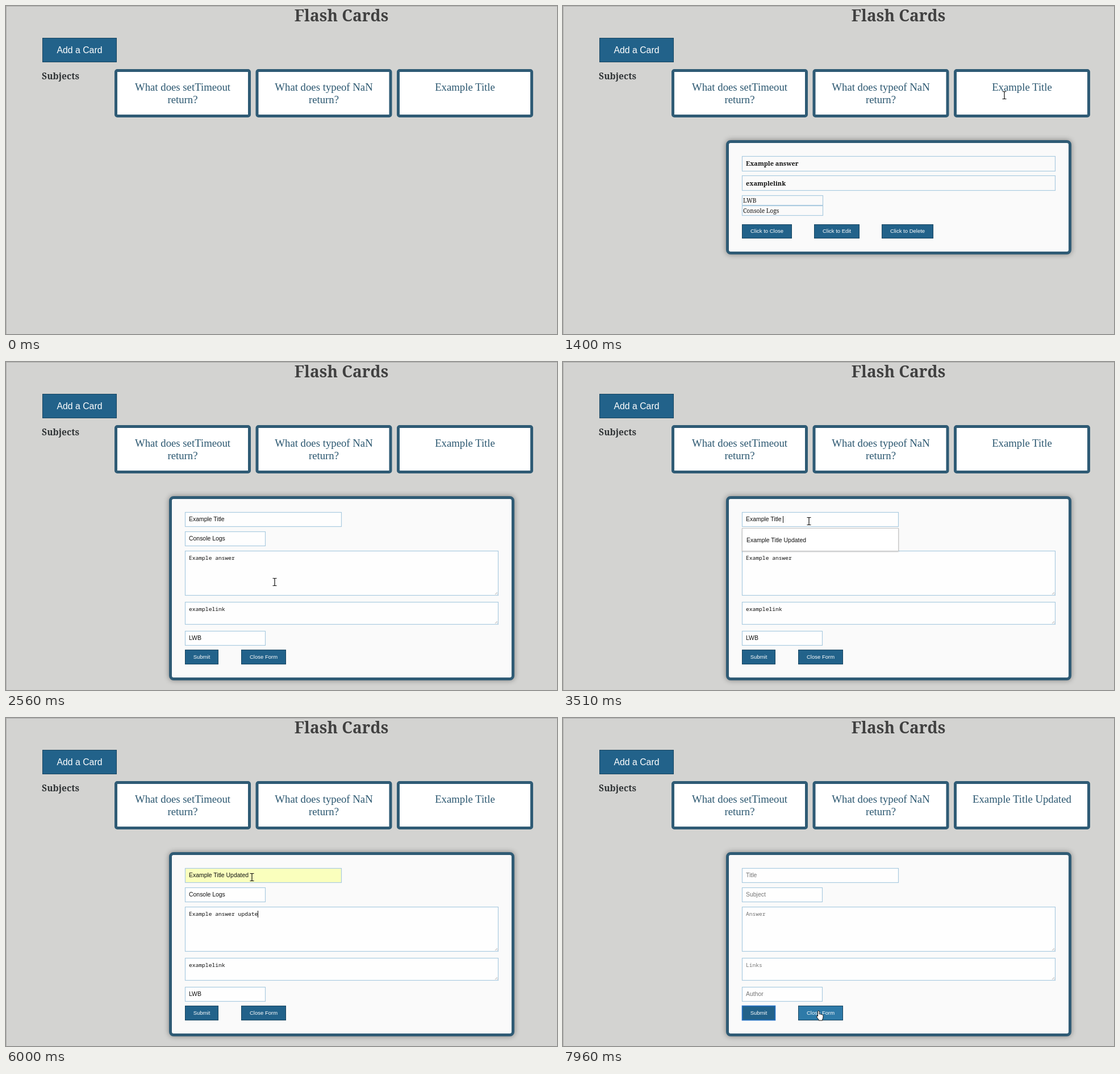
Write an HTML page that moves like this. It is 970x577 px and loops after 8000 ms.

```html
<!DOCTYPE html>
<html lang="en">
<head>
<meta charset="utf-8">
<title>Flash Cards</title>
<style>
  html, body { margin: 0; width: 100%; height: 100%; overflow: hidden; background: #d3d3d1; }
  svg { display: block; width: 970px; height: 577px; }
  text { white-space: pre; font: 10.45px "Liberation Sans", sans-serif; fill: #111; }
  .mid { text-anchor: middle; }
  .heading { font: bold 28px "Noto Serif", serif; fill: #404040; }
  .subjects { font: bold 15.6px "Noto Serif", serif; fill: #303436; }
  .question { font: 18.75px "Liberation Serif", serif; fill: #2b5770; text-anchor: middle; }
  .strong { font: bold 11px "Noto Serif", serif; }
  .serif { font: 10.3px "Noto Serif", serif; }
  .mono { font: 9.65px "Noto Sans Mono", monospace; }
  .hint { fill: #757575; }
  .frame { fill: #fff; stroke: #2f5b75; stroke-width: 5; }
  .panel > .frame { fill: #fafafa; filter: drop-shadow(0 0 5px rgba(0, 0, 0, .4)); }
  .field { fill: #fefefe; stroke: #aacbe0; stroke-width: 1.2; }
  .plain { fill: #fafafa; }
  .filled { fill: #faffbd; }
  .btn rect { fill: #22628a; stroke: #174560; }
  .btn text { fill: #fff; font-size: 9.5px; text-anchor: middle; }
  .btn .big { font-size: 15.8px; }
  .btn.hover rect { fill: #2e7aa8; }
  .btn.focus rect { stroke: #2470c4; stroke-width: 1.6; }
  .selected { fill: #fff; }
  .grip { stroke: #999; stroke-width: .8; fill: none; }
  .menu { fill: #fff; stroke: #c4c4c4; filter: drop-shadow(0 1px 1px rgba(0, 0, 0, .2)); }
  .pointer { fill: #fff; stroke: #111; stroke-width: 1; stroke-linejoin: round; }
  .beam { fill: none; stroke: #111; stroke-width: 1.2; }
</style>
</head>
<body>
<svg id="stage" viewBox="0 0 970 577"></svg>
<script>
const stage = document.getElementById('stage');

function add(parent, tag, attrs, label) {
  const node = document.createElementNS('http://www.w3.org/2000/svg', tag);
  for (const key in attrs) node.setAttribute(key, attrs[key]);
  if (label !== undefined) node.textContent = label;
  parent.appendChild(node);
  return node;
}
const group = (parent, cls = '') => add(parent, 'g', { class: cls });
const write = (parent, x, y, cls, label) => add(parent, 'text', { x, y, class: cls }, label);
const box = (parent, x, y, w, h, cls) =>
  add(parent, 'rect', { x: x + .5, y: y + .5, width: w - 1, height: h - 1, class: cls });
const fill = (parent, x, y, width, height, color) =>
  add(parent, 'rect', { x, y, width, height, fill: color });
const frame = (parent, x, y, w, h, rx) =>
  add(parent, 'rect', { x: x + 2.5, y: y + 2.5, width: w - 5, height: h - 5, rx, class: 'frame' });
const show = (node, on) => node.setAttribute('visibility', on ? 'inherit' : 'hidden');
const inside = (p, [x, y, w, h]) => p.x >= x && p.x < x + w && p.y >= y && p.y < y + h;

function button(parent, x, y, w, h, label, size = '') {
  const node = group(parent, 'btn');
  box(node, x, y, w, h, '');
  write(node, x + w / 2, y + h / 2 + (size ? 5.5 : 2.8), size, label);
  return { node, area: [x, y, w, h] };
}

// Page
fill(stage, 0, 0, 970, 577, '#d3d3d1');
fill(stage, 0, 0, 970, 1, '#adadab');
fill(stage, 0, 0, 1, 577, '#adadab');
write(stage, 590.5, 27, 'heading mid', 'Flash Cards');
button(stage, 64, 56, 131, 43, 'Add a Card', 'big');
write(stage, 63, 129, 'subjects', 'Subjects');
const cards = [
  ['What does setTimeout', 'return?'],
  ['What does typeof NaN', 'return?'],
  ['Example Title']
].map((lines, i) => {
  const x = 191 + i * 248.5;
  frame(stage, x, 111, 240, 85, 2.5);
  return lines.map((line, n) => write(stage, x + 120, 149 + n * 22, 'question', line))[0];
});

// Answer panel
const author = 'LWB';
const detail = group(stage, 'panel');
frame(detail, 287, 236, 608, 201, 5.5);
const detailAreas = [
  [315, 264, 552, 27, 281, 'strong', 'Example answer', 322],
  [315, 298, 552, 27, 315.5, 'strong', 'examplelink', 322],
  [315, 333, 143, 18, 345.5, 'serif', author, 317],
  [315, 351, 143, 18, 363.5, 'serif', 'Console Logs', 317]
].map(([x, y, w, h, base, cls, label, tx]) => {
  box(detail, x, y, w, h, 'field plain');
  write(detail, tx, base, cls, label);
  return [x, y, w, h];
});
const detailButtons = [
  button(detail, 315, 384, 88, 25, 'Click to Close'),
  button(detail, 442, 384, 80, 25, 'Click to Edit'),
  button(detail, 561, 384, 91, 25, 'Click to Delete')
];

// Edit form
const form = group(stage, 'panel');
frame(form, 287, 236, 608, 324, 5.5);
const inputs = [
  [264, 276, 26, '', 'Title', 'Example Title'],
  [298, 142, 26, '', 'Subject', 'Console Logs'],
  [332, 552, 79, 'mono', 'Answer', 'Example answer'],
  [422, 552, 40, 'mono', 'Links', 'examplelink'],
  [473, 142, 26, '', 'Author', author]
].map(([y, w, h, cls, hint, value]) => {
  const rect = box(form, 315, y, w, h, 'field');
  const mark = fill(form, 322, y + 7, 64.5, 12, '#3390ff');
  const text = write(form, 322, y + 16, cls, value);
  show(mark, false);
  if (cls) add(form, 'path', { class: 'grip', d: `M861 ${y + h - 2}l4 -4M864 ${y + h - 2}l1.5 -1.5` });
  return { rect, mark, text, cls, hint, value, area: [315, y, w, h] };
});
const [title, subject, answer] = inputs;
const formButtons = [
  button(form, 315, 506, 59, 26, 'Submit'),
  button(form, 414, 506, 79, 26, 'Close Form')
];
const caret = fill(form, 0, 0, 1, 12, '#111');

// Suggestions below the title
const menu = group(form);
const menuBox = box(menu, 315, 292, 276, 40, 'menu');
const menuMark = fill(menu, 316, 301, 274, 24, '#e8e8e8');
write(menu, 323, 316.5, '', 'Example Title Updated');
const menuExtra = write(menu, 323, 340.5, '', 'Example Title');

// Mouse pointers, each with its hot spot at 0,0
const pointers = {
  arrow: add(stage, 'path', { class: 'pointer', d: 'M0 0V15L3.5 12L6 17.5L8.2 16.5L6 11.2H10.8Z' }),
  beam: add(stage, 'path', { class: 'beam', d: 'M-3.5 -6.5H-1Q0 -6.5 0 -5.5Q0 -6.5 1 -6.5H3.5M0 -5.5V5.5M-3.5 6.5H-1Q0 6.5 0 5.5Q0 6.5 1 6.5H3.5' }),
  hand: add(stage, 'path', { class: 'pointer', d: 'M-1.5 1.2Q-1.4 0 -.2 0T1.2 1.2V6Q3 4.8 3.8 6.3Q5 5.6 6 6.9Q8 6.6 8 8.6V11Q8 13.5 6.8 15V17H0V15.4Q-1.6 13.6 -3.4 10.8Q-4 9.4 -3 8.9Q-2 8.7 -1.5 10Z' })
};

// Mouse moves: first step, last step, step count, destination
const moves = [
  [150, 930, 11, 784, 178],
  [1000, 1260, 4, 784, 148],
  [1400, 2000, 9, 582, 398],
  [2085, 2170, 2, 483, 400],
  [2240, 2350, 2, 482, 399],
  [2500, 2560, 2, 473, 387],
  [2640, 3280, 9, 433, 280],
  [6550, 6780, 4, 456, 350],
  [6860, 7100, 4, 362, 511],
  [7180, 7180, 1, 361, 511],
  [7320, 7960, 10, 450, 515]
];

function mouseAt(t) {
  let x = 859, y = 553;
  for (const [from, to, count, tx, ty] of moves) {
    if (t < from) break;
    const gap = (to - from) / (count - 1) || 1;
    const k = Math.min(1, (Math.floor((t - from) / gap + 1e-6) + 1) / count);
    const ease = k * k * (3 - 2 * k);
    x += (tx - x) * ease;
    y += (ty - y) * ease;
  }
  return { x, y };
}

// Typed text: each entry is a time and the value from then on
const titleTyping = [[3410, 'Example Title '], [3730, 'Example Title U'], [4280, 'Example Title Updated']];
const answerTyping = [[5470, 1], [5700, 2], [5770, 4], [6000, 7], [6230, 8]]
  .map(([t, n]) => [t, 'Example answer' + ' updated'.slice(0, n)]);
const valueAt = (list, t, first) => list.reduce((v, [from, next]) => t >= from ? next : v, first);

function setInput(input, value, sent) {
  input.text.textContent = sent ? input.hint : value;
  input.text.setAttribute('class', input.cls + (sent ? ' hint' : ''));
}

function placeCaret(t) {
  const inTitle = t >= 3280 && t < 4280;
  const inAnswer = t >= 4910 && t < 6550;
  show(caret, inTitle || inAnswer);
  if (!inTitle && !inAnswer) return;
  const input = inTitle ? title : answer;
  caret.setAttribute('x', Math.floor(322 + input.text.getComputedTextLength()));
  caret.setAttribute('y', input.area[1] + 7);
}

function drawMouse(t, view) {
  const p = mouseAt(t);
  const buttons = view === 'form' ? formButtons : view === 'detail' ? detailButtons : [];
  const areas = view === 'form' ? inputs.map(i => i.area) : view === 'detail' ? detailAreas : [];
  let kind = [[693, 116, 230, 75], ...areas].some(a => inside(p, a)) ? 'beam' : 'arrow';
  for (const b of buttons) {
    const over = inside(p, b.area);
    b.node.classList.toggle('hover', over);
    if (over) kind = 'hand';
  }
  for (const name in pointers) {
    show(pointers[name], t >= 150 && name === kind);
    pointers[name].setAttribute('transform', `translate(${Math.round(p.x)} ${Math.round(p.y)})`);
  }
}

function draw(t) {
  const view = t >= 2500 ? 'form' : t >= 1400 ? 'detail' : '';
  const sent = t >= 7320;
  show(detail, view === 'detail');
  show(form, view === 'form');
  cards[2].textContent = sent ? 'Example Title Updated' : 'Example Title';

  for (const input of inputs) setInput(input, input.value, sent);
  if (!sent) {
    title.text.textContent = valueAt(titleTyping, t, title.value);
    answer.text.textContent = valueAt(answerTyping, t, answer.value);
  }
  title.rect.classList.toggle('filled', t >= 4280 && !sent);
  const selected = t >= 4600 && t < 4910;
  show(subject.mark, selected);
  subject.text.classList.toggle('selected', selected);

  const tall = t < 3510;
  show(menu, t >= 3410 && t < 4600);
  menuBox.setAttribute('height', tall ? 64 : 40);
  show(menuExtra, tall && t >= 3410);
  show(menuMark, t >= 4280 && t < 4600);

  formButtons[0].node.classList.toggle('focus', sent);
  placeCaret(t);
  drawMouse(t, view);
}

const start = performance.now();
function tick() {
  draw((performance.now() - start) % 8000);
  requestAnimationFrame(tick);
}
tick();
</script>
</body>
</html>
```
